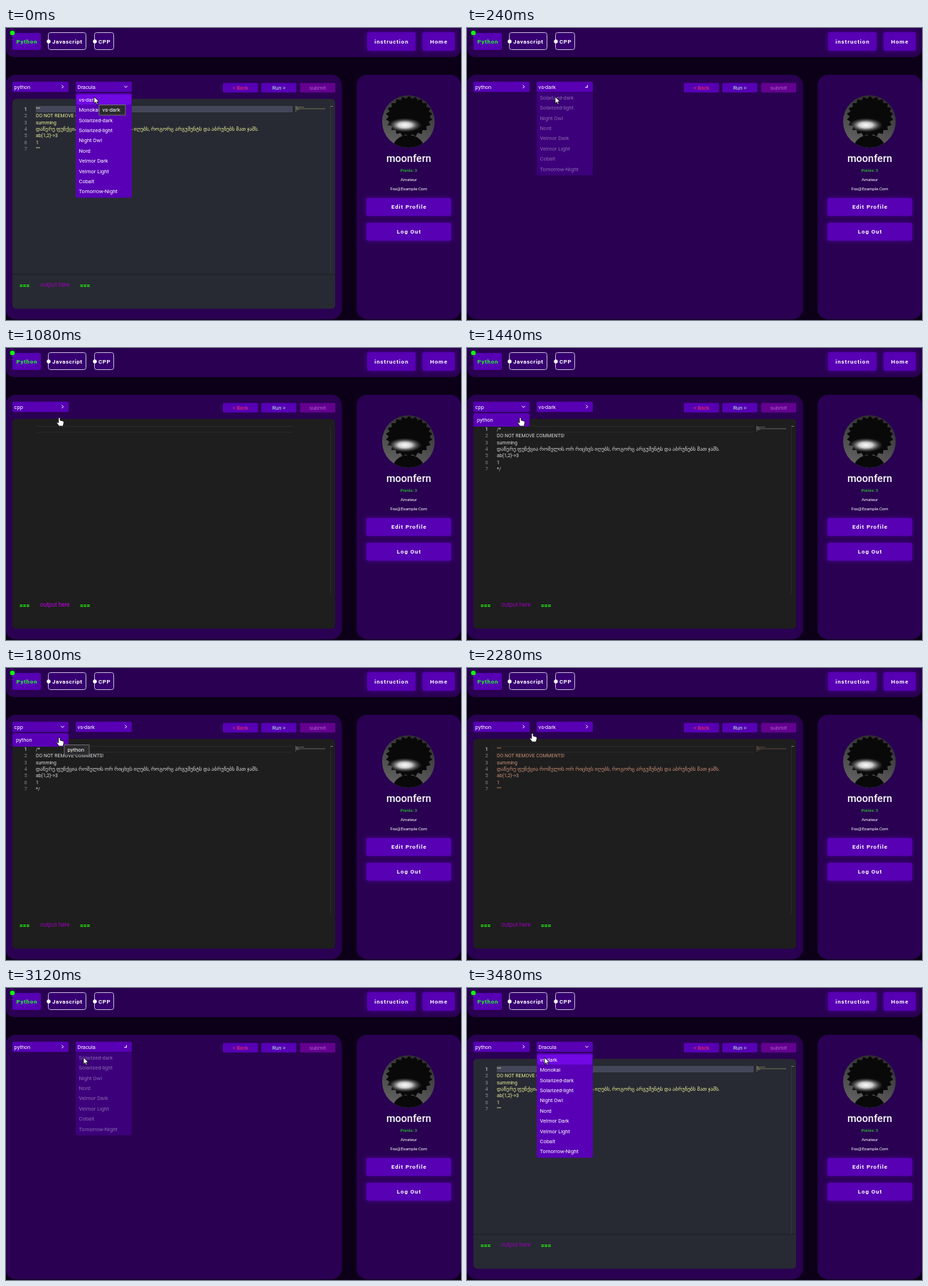
An HTML page with a canvas that plays this animation: 640x412 px, repeating every 3.6 s.

```html
<!DOCTYPE html>
<html lang="en">
<head>
<meta charset="utf-8">
<title>Code editor themes</title>
<style>
html, body { margin: 0; width: 100%; height: 100%; overflow: hidden; background: #0c0018; }
canvas { display: block; width: 640px; height: 412px; }
</style>
</head>
<body>
<canvas id="stage" width="640" height="412"></canvas>
<script>
const c = document.getElementById('stage').getContext('2d');
const LOOP = 3600, STEP = 120;
const PURPLE = '#5700b4', PANEL = '#2a0052';

const THEMES = ['Dracula', 'vs-dark', 'Monokai', 'Solarized-dark', 'Solarized-light', 'Night Owl',
  'Nord', 'Velmor Dark', 'Velmor Light', 'Cobalt', 'Tomorrow-Night'];
const LANGS = ['python', 'cpp'];
const COLORS = {
  'Dracula': { bg: '#272a32', line: '#44475a', string: '#eef29a', num: '#8b909c' },
  'vs-dark': { bg: '#1e1e1e', line: '#2a2a2a', string: '#ce9178', num: '#858585' }
};
const BODY = ['DO NOT REMOVE COMMENTS!', 'summing',
  'დაწერე ფუნქცია რომელის ორ რიცხვს იღებს, როგორც არგუმენტს და აბრუნებს მათ ჯამს.',
  'ab(1,2)->3', '1'];

// [time, language, theme, stage]; stage 0 = unmounted, 1 = empty, 2 = loaded
const EDITOR = [
  [0, 'python', 'Dracula', 2], [120, 'python', 'vs-dark', 0], [360, 'python', 'vs-dark', 1],
  [480, 'python', 'vs-dark', 2], [960, 'cpp', 'vs-dark', 0], [1080, 'cpp', 'vs-dark', 1],
  [1200, 'cpp', 'vs-dark', 2], [1920, 'python', 'vs-dark', 0], [2040, 'python', 'vs-dark', 1],
  [2160, 'python', 'vs-dark', 2], [3000, 'python', 'Dracula', 0], [3240, 'python', 'Dracula', 1],
  [3360, 'python', 'Dracula', 2]
];
// [time, openness]
const THEME_MENU = [[0, 1], [120, .75], [240, .4], [360, .8], [480, 1], [600, .69], [720, .2], [840, 0],
  [2280, 0], [2400, .5], [2520, .9], [2760, .985], [2880, 1], [3000, .75], [3120, .4], [3240, .6],
  [3360, .9], [3480, 1]];
const LANG_MENU = [[600, 0], [720, .6], [840, 1], [960, .5], [1080, 0], [1200, 0], [1320, .5],
  [1440, 1], [1800, 1], [1920, .6], [2040, .1], [2160, 0]];
// [time, x, y]
const POINTER = [[0, 124, 97], [360, 124, 97], [480, 105, 98], [600, 83, 98], [720, 75, 98],
  [2160, 75, 98], [2280, 92, 92], [2400, 109, 94], [2520, 109, 98]];

function track(keys, t, i = 1) {
  const n = keys.findIndex(k => k[0] > t);
  if (n === 0) return keys[0][i];
  if (n < 0) return keys[keys.length - 1][i];
  const a = keys[n - 1], b = keys[n];
  return a[i] + (b[i] - a[i]) * (t - a[0]) / (b[0] - a[0]);
}

function rect(x, y, w, h, fill) {
  c.fillStyle = fill;
  c.fillRect(x, y, w, h);
}

function box(x, y, w, h, r, fill, { glow = 0, stroke } = {}) {
  c.save();
  c.beginPath();
  c.roundRect(x, y, w, h, r);
  c.shadowColor = 'rgba(96,0,204,.65)';
  c.shadowBlur = glow;
  c.fillStyle = fill;
  c.fill();
  c.shadowBlur = 0;
  if (stroke) { c.strokeStyle = stroke; c.stroke(); }
  c.restore();
}

function dot(x, y, r, fill) {
  c.fillStyle = fill;
  c.beginPath();
  c.arc(x, y, r, 0, 7);
  c.fill();
}

function text(s, x, y, size, fill, { weight = 400, space = 0, align = 'left' } = {}) {
  c.font = `${weight} ${size}px Roboto, "DejaVu Sans", sans-serif`;
  c.letterSpacing = space + 'px';
  c.textAlign = align;
  c.fillStyle = fill;
  c.fillText(s, x, y);
}

function button(s, x, y, w, h) {
  box(x, y, w, h, 2, PURPLE, { glow: 6 });
  text(s, x + w / 2 + .4, y + h / 2 + 2.8, 8, '#fff', { weight: 700, space: .85, align: 'center' });
}

function header() {
  box(0, -20, 640, 61, 12, PANEL);
  box(9, 7, 40, 24, 2, PURPLE);
  text('Python', 14.5, 21.8, 8, '#1cff2c', { weight: 700, space: .7 });
  dot(9, 7, 3.3, '#12f312');
  for (const [s, x, w] of [['Javascript', 60, 53], ['CPP', 125, 27]]) {
    box(x - .5, 6.5, w, 24, 3, '#360070', { stroke: '#c4b4da' });
    dot(x, 19, 2.7, '#fff');
    text(s, x + 5, 21.8, 8, '#fff', { weight: 700, space: .5 });
  }
  button('instruction', 508, 6, 68, 26);
  button('Home', 586, 6, 45, 26);
}

function avatar() {
  c.save();
  c.beginPath();
  c.arc(566, 132, 37, 0, 7);
  c.clip();
  const wall = c.createLinearGradient(575, 95, 550, 170);
  wall.addColorStop(0, '#2e2e2e');
  wall.addColorStop(1, '#666');
  rect(529, 95, 74, 74, wall);
  // spiky hair, head and shoulders
  c.fillStyle = '#090909';
  c.beginPath();
  for (let i = 0; i < 44; i++) {
    const a = i * Math.PI / 22, r = i % 2 ? 1 : .87;
    c.lineTo(567 + 33 * r * Math.cos(a), 125 + 29 * r * Math.sin(a));
  }
  c.fill();
  c.beginPath();
  c.ellipse(566, 172, 23, 21, 0, 0, 7);
  c.fill();
  // soft light across the middle
  c.translate(561, 137);
  c.scale(1, .42);
  const light = c.createRadialGradient(0, 0, 0, 0, 0, 24);
  light.addColorStop(0, '#fff');
  light.addColorStop(.4, '#ccc');
  light.addColorStop(1, 'rgba(90,90,90,0)');
  dot(0, 0, 24, light);
  c.restore();
}

function profile() {
  box(493, 66, 147, 345, 15, PANEL);
  avatar();
  const mid = { align: 'center' };
  text('moonfern', 566.5, 189, 14.5, '#fff', { weight: 500, align: 'center' });
  text('Points: 3', 566.5, 203.2, 6, '#27f427', mid);
  text('Amateur', 566.5, 216.2, 6, '#fff', mid);
  text('Fox@Example.Com', 566.5, 229, 6, '#fff', mid);
  button('Edit Profile', 507, 240, 119, 25);
  button('Log Out', 507, 275, 119, 25);
}

function toolbar() {
  const items = [['< Back', 305, PURPLE, '#ff2d62'], ['Run >', 359, PURPLE, '#b9f2e4'],
    ['submit', 413.5, '#64008f', '#b25bd0']];
  for (const [s, x, fill, ink] of items) {
    box(x, 77.5, 49.5, 13.5, 2, fill);
    text(s, x + 24.8, 87.2, 7.5, ink, { align: 'center' });
  }
}

function editor(lang, theme, stage) {
  if (!stage) return;
  const k = COLORS[theme], dracula = theme === 'Dracula';
  box(9, 100, 454, 296, 5, k.bg);
  if (dracula) {
    rect(42, 110, 361, 9, k.line);
    rect(9, 347, 454, 1, '#1d2026');
  } else {
    for (const y of [110, 118.5]) rect(42, y, 361, 1, k.line);
  }
  rect(456, 110, 1, 237, 'rgba(255,255,255,.06)');

  if (stage > 1) {
    const ends = lang === 'cpp' ? ['/*', '*/'] : ['"""', '"""'];
    const ink = lang === 'cpp' ? '#dcdcdc' : k.string;
    [ends[0], ...BODY, ends[1]].forEach((s, i) => {
      const y = 117 + i * 9.35;
      text(i + 1, 29.5, y, 6.9, i ? k.num : '#fff', { align: 'right' });
      text(s, 42, y, i === 3 ? 7.4 : 6.9, ink);
      c.globalAlpha = .5;
      rect(407, 110.3 + i * 1.1, s.length * .54, .7, ink);
      c.globalAlpha = 1;
    });
    rect(456.5, 110, 3.5, 1, '#777');
  }

  for (const x of [19, 104]) text('===', x, 365.5, 8.2, '#25ee10', { weight: 900 });
  text('output here', 48, 365.2, 8.2, stage > 1 ? '#9600b8' : '#c000e6');
}

function chevron(x, y, open) {
  c.save();
  c.translate(x, y);
  c.rotate((open > 0 && open < .9 ? .5 : Math.round(open)) * Math.PI / 2);
  c.strokeStyle = '#fff';
  c.beginPath();
  c.moveTo(-1, -2.2);
  c.lineTo(1.2, 0);
  c.lineTo(-1, 2.2);
  c.stroke();
  c.restore();
}

function select(x, value, options, open, { indent, hover = 0 }) {
  if (open > 0) {
    const h = options.length > 1 ? 147.5 : 19;
    c.save();
    c.beginPath();
    c.rect(x, 91, 79, 160);
    c.clip();
    c.globalAlpha = open;
    c.translate(0, -53 * (1 - open));
    box(x, 92, 79, h, 2, '#5900b6');
    if (hover) box(x + 1, 94, 77, 14, 2, `rgba(130,15,255,${hover})`);
    options.forEach((s, i) => text(s, x + indent, 103.8 + i * 14.4, 7.5, '#fff'));
    c.restore();
  }
  box(x, 75.7, 79, 14.5, 2, PURPLE);
  text(value, x + 2.5, 85.5, 7.5, '#fff');
  chevron(x + 70.5, 82.8, open);
}

function tooltip(s, x, w) {
  box(x + .5, 108.5, w, 14.5, 0, '#2b2a2d', { stroke: '#6e6870' });
  text(s, x + 5, 118.3, 7.8, '#fff');
}

function pointer(x, y, hand) {
  c.save();
  c.translate(x, y);
  c.fillStyle = '#fff';
  c.strokeStyle = '#000';
  c.lineWidth = .8;
  c.beginPath();
  if (hand) {
    c.moveTo(-1.2, 7);
    c.lineTo(-1.2, .8);
    c.quadraticCurveTo(0, -.9, 1.2, .8);
    c.lineTo(1.2, 4);
    c.lineTo(5.2, 5);
    c.quadraticCurveTo(6.6, 5.4, 6.4, 7);
    c.lineTo(5.4, 12.2);
    c.lineTo(-.4, 12.2);
    c.lineTo(-3.8, 7.6);
    c.quadraticCurveTo(-3.4, 5.8, -1.2, 7.6);
  } else {
    for (const p of [[0, 0], [0, 9.5], [2.2, 7.5], [3.8, 11], [5.3, 10.3], [3.8, 7], [6.8, 6.8]]) c.lineTo(...p);
  }
  c.closePath();
  c.fill();
  c.stroke();
  c.restore();
}

function draw(t) {
  const now = EDITOR.findLastIndex(e => e[0] <= t);
  const [, lang, theme, stage] = EDITOR[now];
  // the theme list is hidden while a new language loads
  const newLang = now > 0 && stage < 2 && t >= 960 && t < 2160;
  const x = track(POINTER, t), y = track(POINTER, t, 2), hand = x < 95;

  rect(0, 0, 640, 412, '#0c0018');
  header();
  box(-1, 66, 473.5, 345, 15, PANEL);
  profile();
  toolbar();
  editor(lang, theme, stage);

  select(9, lang, LANGS.filter(s => s !== lang), track(LANG_MENU, t), { indent: 5 });
  if (!newLang) {
    const hover = hand ? 0 : theme === 'Dracula' ? .6 : .22;
    select(98, theme, THEMES.filter(s => s !== theme), track(THEME_MENU, t), { indent: 4.5, hover });
  }

  if (t < 120) tooltip('vs-dark', 130.5, 37);
  if (t >= 1680 && t < 1920) tooltip('python', 81.5, 35);
  pointer(x, y, hand);
}

const start = performance.now();
function frame() {
  const t = (performance.now() - start) % LOOP;
  draw(Math.floor(t / STEP) * STEP);
  requestAnimationFrame(frame);
}
frame();
</script>
</body>
</html>
```
